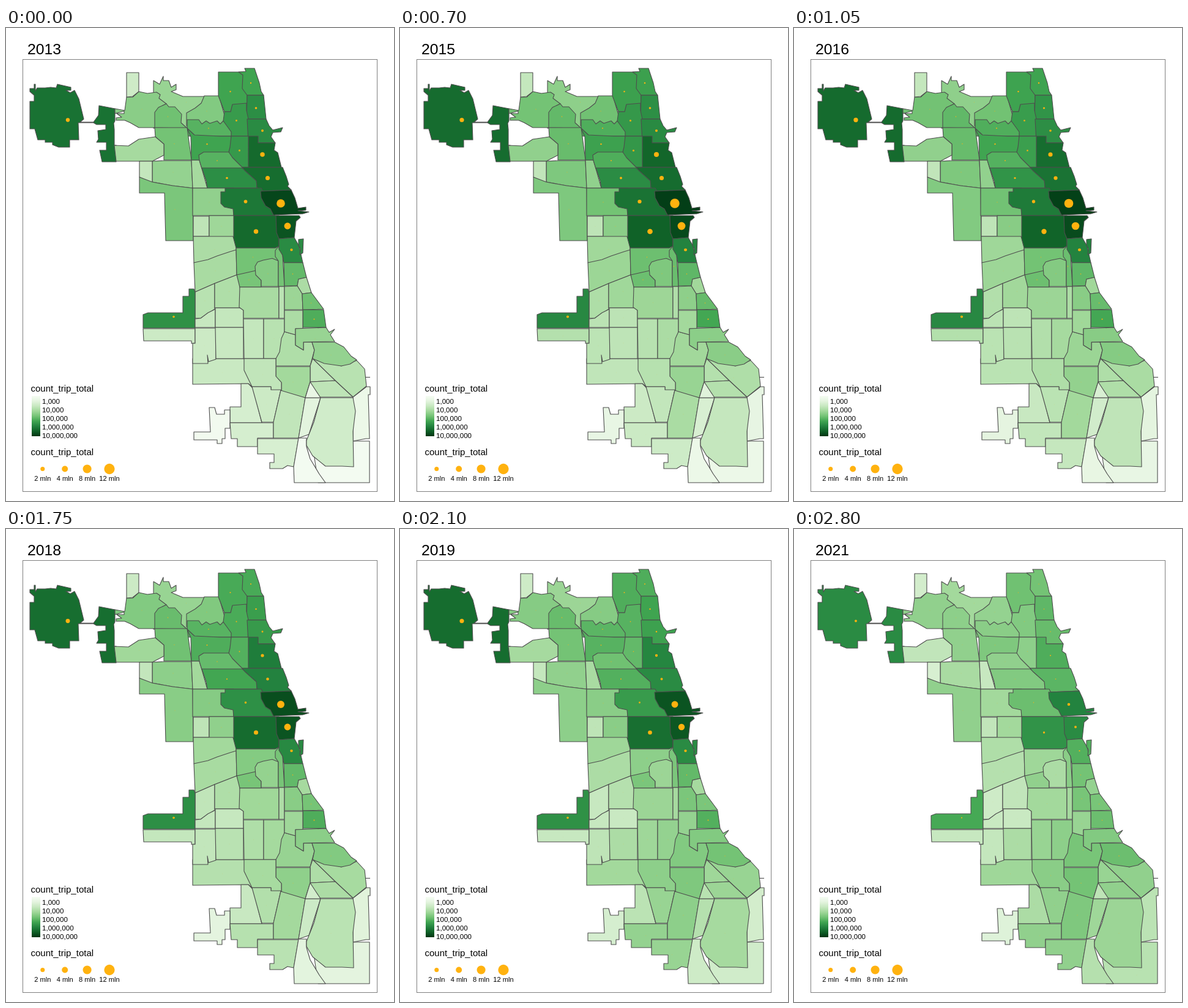
Animation of 634 by 774 pixels, one loop 3150 ms. Source, as an HTML page:

```html
<!DOCTYPE html>
<html lang="en">
<meta charset="utf-8">
<title>Trips per area and year</title>
<style>
  html, body { margin: 0; width: 100%; height: 100%; overflow: hidden; background: #fff; }
  svg { display: block; font-family: "Liberation Sans", Arial, sans-serif; }
  #map { stroke: #4d4d4d; stroke-width: 1.1; stroke-linejoin: round; }
  .dot { fill: #ffb20f; }
</style>
<svg width="634" height="774">
  <defs><linearGradient id="scale" x2="0" y2="1"></linearGradient></defs>
  <rect x="27.5" y="51.5" width="579" height="707" fill="none" stroke="#808080"/>
  <text id="year" x="35" y="43" font-size="24.8"></text>
  <g id="map"><path d="M573 571.5H595"/></g>
  <g id="dots"></g>
  <g id="legend">
    <text x="40.5" y="595" font-size="15">count_trip_total</text>
    <rect x="42" y="602" width="14" height="66" fill="url(#scale)"/>
    <text x="40.5" y="699" font-size="15">count_trip_total</text>
  </g>
</svg>
<script>
const FRAME = 350, FIRST = 2013, YEARS = 9;
const ramp = ["#f6fcf4", "#e4f4df", "#c7e8c0", "#a1d89a", "#74c375", "#40a551", "#23833f", "#0f6026", "#003413"]
  .map(hex => [1, 3, 5].map(i => parseInt(hex.substr(i, 2), 16)));
const areas = [];

function set(node, attrs) {
  for (const k in attrs) node.setAttribute(k, attrs[k]);
}

function add(parent, tag, attrs, text = "") {
  const node = document.createElementNS("http://www.w3.org/2000/svg", tag);
  set(node, attrs);
  node.textContent = text;
  return document.getElementById(parent).appendChild(node);
}

// Levels run 0-100 on a log scale: a in 2013, e in 2019, f in 2021.
// A bump lifts the early years; losses come steadily, gains come late.
function everyYear([a, e, f, bump = 3]) {
  const [p, q, r] = e < a ? [0.1, 0.4, 0.75] : [0.05, 0.25, 0.5];
  const at = (s, lift) => a + (e - a) * s + lift;
  const b = at(p, bump), c = at(q, bump), d = at(r, bump / 4);
  return [a, b, b + (c - b) / 4, c, (c + d) / 2, d, e, Math.min(e, f + (e - f) / 10), f];
}

// Later areas cover earlier ones, so shared borders are drawn only once.
function area(d, levels, spot) {
  const shape = add("map", "path", { d: d + "Z" });
  const box = shape.getBBox();
  const [cx, cy] = spot || [box.x + box.width / 2, box.y + box.height / 2];
  areas.push({ shape, dot: add("dots", "circle", { cx, cy, class: "dot" }), levels: everyYear(levels) });
}

function colour(level) {
  const x = level / 12.5, i = Math.min(7, Math.floor(x));
  return `rgb(${ramp[i].map((v, k) => Math.round(v + (ramp[i + 1][k] - v) * (x - i)))})`;
}

const radius = millions => 2.49 * Math.sqrt(millions);
const trips = level => 10 ** (2.36 + 0.0475 * level - 6);

function northWest() {
  area("M39 120H46V110L39 104V99H46V92H48V103L51 98H64L73 97L82 98L84 92L106 97V102H98L105 106L112 102L119 116L127 149L121 154H143L151 143L152 127L178 132V152L176 156L177 166V192H180V219H157L153 200H164V187H148L151 182L150 168L163 166V158H148L143 155H118L119 183H104V195H86L76 191V187H64V183H52L47 165H39", [81, 83, 72, 2], [101, 150.5]);
  area("M241 86L251 92L257 79V86H266L270 97L278 92V101L270 104L289 112H348V164H241", [40, 39, 37]);
  area("M324 111H348L362 160H295V139L309 131L319 123", [46, 45, 41, 5], [328, 136]);
  area("M296 150H315L320 157L327 152L333 156L345 152L350 157L355 152L370 170V177H296", [57, 56, 44, 2], [331, 164]);
  area("M178 132L194 135L197 113H207L217 104L231 107L246 105L252 109L250 115L262 124L250 130V163H217L203 155L194 151H180V147L189 146L181 140H193V136L178 140", [44, 45, 42, 6], [222, 133]);
  area("M243 163V138L249 130L262 124L266 129H276L287 141L286 155L296 164", [51, 53, 43], [264.5, 145]);
  area("M197 73H217V104L207 112L197 113", [22, 22, 20, 4]);
  area("M243 163H296L303 216H258V190L244 178", [50, 50, 42], [275, 189.5]);
  area("M177 192L200 193L217 182L244 178L258 190V208L239 218H180", [36, 36, 27, 6]);
  area("M239 218L258 217H303L305 262L272 258L239 252", [41, 42, 35, 6], [273, 236]);
  area("M218 218H239V254L218 244", [26, 26, 18, 1]);
  area("M303 216H316L329 262H305", [36, 35, 25, 6]);
  area("M218 244L239 252L272 258L305 262L306 348H261L259 270H218", [48, 43, 42, 0], [276, 297]);
}

function northSide() {
  area("M347 72H394V137H357L347 111", [63, 59, 51, 2], [366.5, 104]);
  area("M380 72L392 71L390 66H406L414 90L417 104L421 110H394L386 99L387 77", [63, 59, 50, 2], [400, 90]);
  area("M394 110H421L425 149H393", [71, 63, 55, 1], [408.5, 131]);
  area("M393 123V135L396 149V177H368V170L355 152L357 137H367L370 125", [66, 57, 46], [376.5, 151.5]);
  area("M394 149H425L430 160L436 167L452 163L449 170L436 171L433 178L440 188H396", [72, 64, 53, 2], [419, 168]);
  area("M396 177H412V188H440L438 200L444 204L450 228H395", [84, 74, 59], [419, 207]);
  area("M296 164L308 175L349 177H368V216H303L302 178", [63, 57, 47, 2], [328.5, 190]);
  area("M316 217L315 208L323 203H366L390 230H320", [57, 51, 42], [345, 217]);
  area("M368 177H396V228H386L370 212L364 203L366 195", [67, 54, 43], [381.5, 200.5]);
  area("M320 229H386L410 250V262H329L327 250", [71, 58, 46], [361, 245.5]);
  area("M386 228H452L458 243L462 256L460 259L466 265L417 267L410 261L409 250L390 233", [83, 72, 56, 2], [427.5, 245.5]);
}

function centre() {
  area("M305 262H372V307H305", [42, 44, 37, 8], [332, 285]);
  area("M358 262H417L440 307H372L371 296L357 293L351 287V268H358", [79, 66, 52, 4], [391.5, 284]);
  area("M416 267L466 265L472 278L477 295L490 293V298L477 299L495 301L485 304L437 306L432 296L424 291L417 278", [95, 91, 75], [449, 287]);
  area("M372 307H446V357L440 360H376L371 350", [84, 82, 69], [408.5, 333]);
  area("M441 307H479L481 310L474 316L471 343L446 345L442 335", [91, 90, 72], [460, 324]);
  area("M306 308H332V341H306", [28, 28, 27, 0]);
  area("M332 307H372V342H332", [38, 44, 37, 5]);
  area("M306 341H371L376 360V384H307", [34, 38, 33]);
  area("M307 384L330 379L345 373L366 366L376 363L377 404L341 418L309 432", [35, 34, 31, 4]);
  area("M376 360H440L446 357V404H377", [50, 43, 38], [403.5, 375]);
  area("M377 404L408 397H417V424H382L377 420", [49, 48, 42], [397, 412]);
  area("M407 390L411 383L420 380L435 377L445 381V423H417V413L408 404", [45, 39, 34], [428, 402]);
  area("M440 364L446 357L452 372L455 423H445V381L440 374", [50, 48, 44]);
  area("M446 345L471 343L479 357L485 384H454L452 372L446 362", [72, 72, 58], [466.5, 363]);
  area("M478 346L486 345L485 368L480 371L481 361L478 356", [72, 72, 58], [466.5, 363]);
  area("M454 384H485L491 408L478 411L476 422H455", [54, 54, 50, 1], [468.5, 402.5]);
  area("M478 411L491 408L499 433L484 435L476 422", [34, 36, 41]);
}

function southWest() {
  area("M309 432L341 418V460L318 475H309", [30, 25, 22, 4]);
  area("M341 418L377 404L382 424L388 458H341", [33, 31, 27, 5]);
  area("M224 469L232 466H289V439H299V427H307L309 432V491H224", [70, 70, 61], [274, 472.5]);
  area("M224 492H309V516H303V512H225", [23, 25, 25, 8]);
  area("M309 476L318 475L330 466L342 460V490H309", [25, 25, 24, 4]);
  area("M342 458H388V490H342", [26, 24, 24]);
  area("M305 541H389L402 587L396 582L305 583", [24, 37, 38, 2]);
  area("M309 491H343V542L331 546L329 535L330 549H305V516H309", [23, 28, 26, 5]);
  area("M342 490H388V541H343", [24, 34, 34]);
}

function southSide() {
  area("M382 424H446V475H388V462L381 457", [35, 39, 37]);
  area("M446 423H455V475H446", [29, 36, 36]);
  area("M455 423L476 422L484 435L485 461H455", [39, 48, 49]);
  area("M484 435L499 433L519 460L485 461", [51, 48, 49], [498.5, 450]);
  area("M485 461H519L523 490H485", [59, 58, 52], [503.5, 476.5]);
  area("M388 476H421V541H389", [26, 38, 40]);
  area("M421 476H455V541H421", [30, 41, 43]);
  area("M455 497L473 502V519L486 527V514H500L504 527L497 553H441V541L447 530L450 508", [33, 46, 49]);
  area("M455 462H485V492H473V502L455 497", [34, 41, 40, 2]);
  area("M473 492L523 490L528 498L537 493L530 502L537 513L486 514V527L473 519", [40, 46, 46]);
  area("M501 541L548 553L573 544L586 558L589 586L567 604L538 577", [30, 40, 42, 2]);
  area("M500 514H537L552 522L564 537L573 543L562 550L548 553L520 549L501 541L504 527", [41, 50, 52, 2], [531, 535]);
  area("M501 541L538 577L497 579V553", [27, 38, 40]);
  area("M497 579L538 577L567 604H509", [28, 39, 42, 2]);
  area("M441 554H497V579L489 605L450 596V580L441 570", [37, 47, 50, 2]);
  area("M389 541H441V570L450 580V593H433V587H402L389 560", [27, 43, 44, 2]);
}

function farSouth() {
  area("M384 582H396L404 590L418 646H366V620H384", [19, 29, 34]);
  area("M402 587H433V592H449L437 645H418", [23, 40, 42, 2]);
  area("M332 621H341L344 632H357V625H366V655H358V672H353V680H345V674H307V661H334", [3, 19, 15, 5]);
  area("M366 646H437V671H411V685H378V672H368", [19, 41, 42, 2]);
  area("M411 672H478L470 718L460 716L452 721H431V711H438V697H411", [18, 40, 42, 2]);
  area("M449 593L489 605L478 671H437V645", [27, 43, 47, 6]);
  area("M489 605H514L495 665L478 671", [13, 31, 38]);
  area("M497 579L514 605H489", [9, 30, 28]);
  area("M500 676H594V744H510", [2, 21, 30], [560, 730]);
  area("M478 671H491V685L497 705L512 730L522 744H471L470 718", [2, 22, 31]);
  area("M567 604L589 587H595V600H592L594 672H588L567 676", [7, 20, 29, 2]);
  area("M514 605H567L571 627L567 660L568 718L549 717H522L501 700L491 683V675L503 645", [21, 36, 39]);
}

[northWest, northSide, centre, southWest, southSide, farSouth].forEach(draw => draw());

for (let i = 0; i < 9; i++)
  add("scale", "stop", { offset: i / 8, "stop-color": colour(i * 12.5) });
for (let i = 0; i < 5; i++)
  add("legend", "text", { x: 59, y: 615 + 14 * i, "font-size": 11.6 }, (10 ** (i + 3)).toLocaleString("en-US"));
[2, 4, 8, 12].forEach((n, i) => {
  const x = 59.8 + 36.4 * i;
  add("legend", "circle", { cx: x, cy: 721.5, r: radius(n), class: "dot" });
  add("legend", "text", { x, y: 741, "font-size": 11.1, "text-anchor": "middle" }, n + " mln");
});

let shown = -1;
function tick() {
  const y = Math.floor(performance.now() / FRAME) % YEARS;
  if (y !== shown) {
    shown = y;
    document.getElementById("year").textContent = FIRST + y;
    for (const { shape, dot, levels } of areas) {
      set(shape, { fill: colour(levels[y]) });
      set(dot, { r: radius(trips(levels[y])) });
    }
  }
  requestAnimationFrame(tick);
}
tick();
</script>
</html>
```
